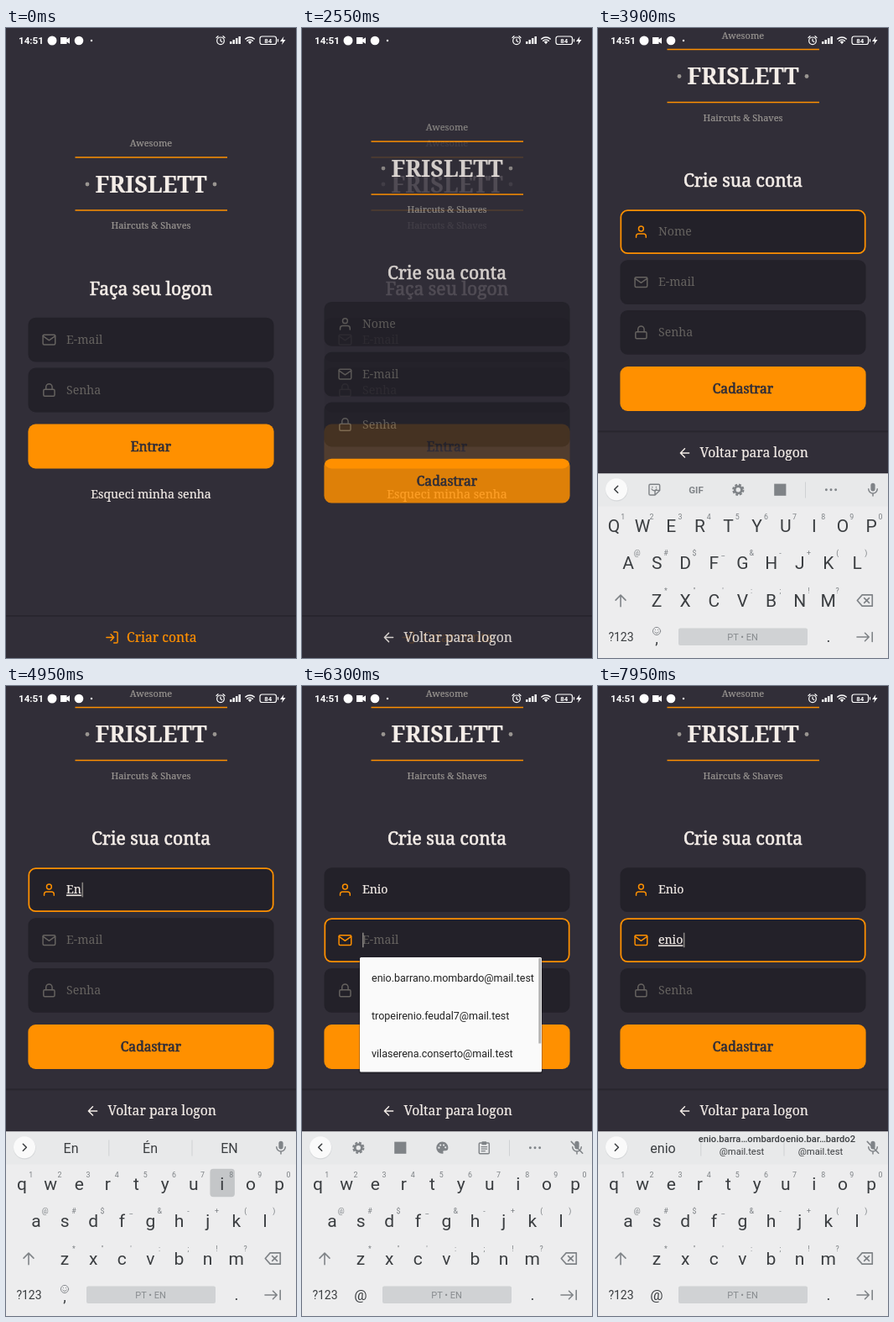
Recreate the animation shown at these times as an HTML page. Size 346 by 750 pixels, loop 8 s.

```html
<!DOCTYPE html>
<html lang="pt-BR">
<head>
<meta charset="utf-8">
<title>Cadastro</title>
<style>
html, body { margin: 0; width: 100%; height: 100%; overflow: hidden; background: #312e38; }
svg { display: block; width: 100vw; height: 100vh; }
text { font-family: Roboto, 'Open Sans', sans-serif; white-space: pre; stroke-width: 0; }
.slab, .slab text { font-family: 'Roboto Slab', 'Noto Serif', serif; }
.slab text { stroke-width: .2px; stroke-linejoin: round; }
.slab .strong { stroke-width: .65px; }
.mid { text-anchor: middle; }
.ic { fill: none; stroke: currentColor; stroke-linecap: round; stroke-linejoin: round; }
.ic .f { fill: currentColor; stroke: none; }
.ic .hole { fill: #e8e9ea; stroke: none; }

.box { fill: #232129; stroke: #232129; stroke-width: 1.76; }
.field { color: #666360; }
.field.on { color: #ff9000; }
.field.focus .box { stroke: #ff9000; }
.hint { fill: #666360; }
.value { fill: #f4ede8; stroke: #f4ede8; }
.value.typing { text-decoration: underline; }
.caret { fill: #85827f; }

#press { animation: press 8s linear infinite; }
#signup { animation: appear 8s linear infinite; }
#form { animation: lift-form 8s step-end infinite; }
#foot { animation: lift-foot 8s step-end infinite; }
#board { animation: slide 8s linear infinite; }
@keyframes press { 0%, 24.2% { opacity: 1 } 25.8%, 28.4% { opacity: .2 } 30.5%, 100% { opacity: 1 } }
@keyframes appear { 0%, 28.5% { opacity: 0 } 32.5%, 100% { opacity: 1 } }
@keyframes lift-form { 0% { transform: none } 46.5%, 100% { transform: translateY(-109.6px) } }
@keyframes lift-foot { 0% { transform: none } 46.5%, 100% { transform: translateY(-219.6px) } }
@keyframes slide {
  0%, 45% { transform: translateY(222px); animation-timing-function: ease-out }
  48%, 100% { transform: none }
}
</style>
</head>
<body>
<svg viewBox="0 0 346 750" preserveAspectRatio="none">
  <rect width="346" height="750" fill="#312e38"/>
  <g id="login" class="slab"></g>
  <g id="signup" class="slab">
    <rect width="346" height="750" fill="#312e38"/>
    <g id="form"></g>
    <g id="foot"></g>
  </g>
  <g id="popup"></g>
  <g id="board">
    <rect y="530.5" width="346" height="220" fill="#ededee"/>
    <rect y="530.5" width="346" height="39" fill="#e8e9ea"/>
    <g id="strip"></g>
    <g id="keys"></g>
  </g>
  <g id="status"></g>
</svg>
<script>
const $ = id => document.getElementById(id);
const ORANGE = '#ff9000', WHITE = '#f4ede8', GREY = '#7f8387', INK = '#3b3e41';

const ICONS = {
  mail: '<rect x="2" y="4" width="20" height="16" rx="2"/><path d="M22 6 12 13 2 6"/>',
  lock: '<rect x="3" y="11" width="18" height="11" rx="2"/><path d="M7 11V7a5 5 0 0 1 10 0v4"/>',
  user: '<path d="M20 21v-2a4 4 0 0 0-4-4H8a4 4 0 0 0-4 4v2"/><circle cx="12" cy="7" r="4"/>',
  enter: '<path d="M15 3h4a2 2 0 0 1 2 2v14a2 2 0 0 1-2 2h-4M10 17l5-5-5-5M15 12H3"/>',
  back: '<path d="M19 12H5M12 19l-7-7 7-7"/>',
  left: '<path d="M14.5 6l-6 6 6 6"/>',
  right: '<path d="M9.5 6l6 6-6 6"/>',
  shift: '<path d="M12 21V4M4.5 11.5 12 4l7.5 7.5"/>',
  erase: '<path d="M22.5 4H8L1 12l7 8h14.5zM11 8.5l7 7M18 8.5l-7 7"/>',
  next: '<path d="M0 12h18M12 6l6 6-6 6M23 5v14"/>',
  smile: '<circle cx="12" cy="12" r="10"/><path d="M7 14a5.5 5.5 0 0 0 10 0M8.5 8.5v.5M15.5 8.5v.5"/>',
  sticker: '<path d="M21 13V5a2 2 0 0 0-2-2H5a2 2 0 0 0-2 2v14a2 2 0 0 0 2 2h8l8-8h-6a2 2 0 0 0-2 2v6M7.5 11a4.5 4.5 0 0 0 8 0M8.5 7.5v.5M15 7.5v.5"/>',
  gear: '<circle cx="12" cy="12" r="5.8" stroke-width="4"/><circle cx="12" cy="12" r="8.6" stroke-width="3" stroke-linecap="butt" stroke-dasharray="4 2.754"/>',
  square: '<rect class="f" x="2" y="2" width="20" height="20"/>',
  palette: '<path class="f" d="M12 2a10 10 0 0 0 0 20c2 0 2.3-1.5 1.6-2.6-.8-1.4.2-2.4 1.5-2.4H17a5 5 0 0 0 5-5C22 6 17 2 12 2z"/>' +
    [[6.5, 12], [9, 7.5], [14.5, 7.5], [17.5, 11.5]].map(([x, y]) => `<circle class="hole" cx="${x}" cy="${y}" r="1.6"/>`).join(''),
  clip: '<rect x="3.5" y="4" width="17" height="18" rx="1.5"/><rect class="f" x="8" y="1.5" width="8" height="5.5" rx="1"/><path d="M7.5 10.5h9M7.5 14h9M7.5 17.5h6"/>',
  dots: '<circle class="f" cx="3" cy="12" r="2.3"/><circle class="f" cx="12" cy="12" r="2.3"/><circle class="f" cx="21" cy="12" r="2.3"/>',
  mic: '<rect class="f" x="8.5" y="1.5" width="7" height="13" rx="3.5"/><path d="M5 11a7 7 0 0 0 14 0M12 18v4"/>',
  muted: '<rect class="f" x="8.5" y="1.5" width="7" height="13" rx="3.5"/><path d="M5 11a7 7 0 0 0 14 0M12 18v4M3 2.5l18 18.5"/>'
};

const icon = (cx, cy, name, color, size = 17.6, weight = 2) =>
  `<g class="ic" ${color ? `color="${color}"` : ''} stroke-width="${weight}" transform="translate(${cx - size / 2} ${cy - size / 2}) scale(${size / 24})">${ICONS[name]}</g>`;
const label = (x, y, str, size, color, cls = '', weight = 400) =>
  `<text x="${x}" y="${y}" font-size="${size}" fill="${color}" stroke="${color}" class="${cls}" font-weight="${weight}">${str}</text>`;
const mid = (x, y, str, size, color, weight) => label(x, y, str, size, color, 'mid', weight);
const strong = (y, str, size, color) => label(173, y, str, size, color, 'mid strong');
const rule = y => `<path d="M82.5 ${y}h181.5" stroke="${ORANGE}" stroke-width="1.6"/>`;

// Form pieces
const logo = dy => `<g transform="translate(0 ${dy})">
  ${mid(173, 141, 'Awesome', 11, '#999591')}${rule(154)}
  <circle cx="97" cy="186" r="2.4" fill="#999591"/><circle cx="249" cy="186" r="2.4" fill="#999591"/>
  ${mid(173, 195.5, 'FRISLETT', 27, WHITE, 700)}${rule(217)}
  ${mid(173, 239, 'Haircuts &amp; Shaves', 11, '#999591')}</g>`;
const field = (y, name, hint, id = '') => `<g class="field" id="${id}" transform="translate(26.4 ${y})">
  <rect class="box" x=".9" y=".9" width="291.4" height="51" rx="8"/>
  ${icon(25, 26.4, name)}
  <text class="hint" x="45.6" y="31.2" font-size="14.1">${hint}</text>
  <text class="value" x="45.6" y="31.2" font-size="14.1"></text>
  <rect class="caret" y="17.5" width="1.6" height="17.5" visibility="hidden"/></g>`;
const button = (y, str) =>
  `<rect x="26.4" y="${y}" width="293.2" height="52.8" rx="8.8" fill="${ORANGE}"/>` +
  strong(y + 32, str, 15.6, '#312e38');
const footer = (name, ix, x, str, color) =>
  `<rect y="699.4" width="346" height="1.1" fill="#232129"/>` +
  icon(ix, 725.5, name, color) + label(x, 731, str, 15.7, color);

$('login').innerHTML = logo(0) + strong(317.5, 'Faça seu logon', 21.1, WHITE) +
  field(344.7, 'mail', 'E-mail') + field(404.6, 'lock', 'Senha') + button(471.6, 'Entrar') +
  mid(173, 560.3, 'Esqueci minha senha', 14.2, WHITE) +
  `<g id="press">${footer('enter', 126.5, 144, 'Criar conta', ORANGE)}</g>`;
$('form').innerHTML = logo(-18.9) + strong(298.6, 'Crie sua conta', 21.1, WHITE) +
  field(325.9, 'user', 'Nome', 'name') + field(385.8, 'mail', 'E-mail', 'mail') +
  field(445.6, 'lock', 'Senha') + button(512.7, 'Cadastrar');
$('foot').innerHTML = footer('back', 103.5, 121.5, 'Voltar para logon', WHITE);

$('popup').innerHTML = `<rect x="68" y="323.5" width="219" height="138" rx="2" fill="#000" opacity=".25"/>
  <rect x="69" y="323" width="217" height="136.5" rx="1.5" fill="#fafafa"/>
  <rect x="282.3" y="324" width="3" height="101.5" fill="#b3b3b3"/>` +
  ['enio.barrano.mombardo', 'tropeirenio.feudal7', 'vilaserena.conserto']
    .map((user, i) => label(83, 351.5 + 45.2 * i, user + '@mail.test', 12.5, '#212121')).join('');

const bars = [3, 5, 7, 9].map((h, i) => `<rect x="${267 + i * 3.5}" y="${19 - h}" width="2.4" height="${h}" fill="#fff"/>`).join('');
$('status').innerHTML = label(15, 19, '14:51', 11.6, '#fff', '', 700) +
  `<circle cx="55" cy="15" r="5.5" fill="#fff"/>
  <path d="M65 11h7.5v2.5l3.5-2.3v7.6l-3.5-2.3v2.5H65z" fill="#fff"/>
  <circle cx="87" cy="15" r="5.3" fill="#fff"/><circle cx="102" cy="15" r="1.2" fill="#fff"/>
  <g fill="none" stroke="#fff" stroke-width="1.2" stroke-linecap="round">
    <circle cx="256" cy="15.3" r="4.3"/><path d="M256 13v2.5l1.8 1M251 11.5l2-1.8M261 11.5l-2-1.8"/>
    <path d="M285.8 13a7.5 7.5 0 0 1 10.4 0M287.7 15.3a4.8 4.8 0 0 1 6.6 0" stroke-width="1.5"/>
    <rect x="303" y="10" width="19.5" height="9.5" rx="2.5"/><path d="M324.5 13.5v2.5"/>
  </g>
  <path d="M288.8 16.5a3.5 3.5 0 0 1 4.4 0L291 19.3z" fill="#fff"/>
  <path d="M331.5 10l-4.5 6h3l-1 4 4.5-6h-3z" fill="#fff"/>` + bars +
  mid(312.7, 17.6, '84', 7.8, '#fff', 700);

// Keyboard
const ROWS = [
  { chars: 'qwertyuiop', x: 19, y: 600.3, hints: '1234567890' },
  { chars: 'asdfghjkl', x: 36, y: 644, hints: '@#$_&-+()' },
  { chars: 'zxcvbnm', x: 70, y: 688.6, hints: '*"\':;!?' }
];
const PITCH = 34.13;

function keys(caps, pressed, mailMode) {
  let out = '';
  for (const { chars, x, y, hints } of ROWS) {
    [...chars].forEach((c, i) => {
      const cx = x + PITCH * i;
      if (c === pressed) out += `<rect x="${cx - 14.5}" y="${y - 25.5}" width="29.5" height="33.5" rx="4" fill="#c4c6c8"/>`;
      out += mid(cx, y, caps ? c.toUpperCase() : c, 21, INK) +
        mid(cx + 10.8, y - 15.8, hints[i].replace('&', '&amp;'), 8.8, '#7c8084');
    });
  }
  const comma = mailMode ? mid(70, 730.5, '@', 17, INK)
    : icon(70, 718, 'smile', GREY, 11, 2) + mid(70, 733, ',', 18, INK);
  return out + icon(27, 681.5, 'shift', GREY, 19) + icon(318.5, 681.5, 'erase', GREY, 20) +
    mid(27.5, 729.6, '?123', 14, INK) + comma +
    `<rect x="96" y="714.5" width="154" height="20.5" rx="2" fill="#d0d2d4"/>` +
    mid(172.5, 729, 'PT • EN', 11, '#888c8f') + mid(275, 730.5, '.', 19, INK) +
    icon(318.5, 725, 'next', GREY, 19);
}

const divider = x => `<path d="M${x} 540.5v19" stroke="#cfd1d3"/>`;
const chevron = dir => `<circle cx="22.2" cy="550.2" r="13.3" fill="#d6d8da"/>
  <circle cx="22" cy="549.3" r="13" fill="#fafafa"/>` + icon(22, 549.3, dir, INK, 16, 2.3);

function strip(word, mailMode) {
  const mic = icon(328, 549.5, mailMode ? 'muted' : 'mic', GREY, 18);
  if (!word) {
    const tools = mailMode ? ['gear', 'square', 'palette', 'clip'] : ['sticker', '', 'gear', 'square'];
    return chevron('left') + tools.map((name, i) => name
      ? icon(67.3 + 50 * i, 549.7, name, GREY, 17)
      : mid(117, 553.5, 'GIF', 11.5, GREY, 700)).join('') +
      divider(247.5) + icon(278, 549.7, 'dots', GREY, 15) + mic;
  }
  const pair = (x, a) => mid(x, 542.5, a, 11.2, INK, 500) + mid(x, 558, '@mail.test', 11.2, INK);
  const rest = mailMode
    ? pair(171.5, 'enio.barra…ombardo') + pair(265.5, 'enio.bar…bardo2')
    : mid(172, 555.5, word.replace('E', 'É'), 16, INK) + mid(266.5, 555.5, word.toUpperCase(), 16, INK);
  return chevron('right') + mid(77.5, 555.5, word, 16, INK) + divider(122.8) + divider(222) + rest + mic;
}

// Timeline, in ms
const LOOP = 8000, HOLD = 180;
const entries = {
  name: { word: 'Enio', hint: 'Nome', focus: 3400, blur: 5850, times: [4600, 4820, 5100, 5350] },
  mail: { word: 'enio', hint: 'E-mail', focus: 5850, blur: LOOP, times: [6900, 7100, 7350, 7560] }
};
const POPUP_AT = 6100;

function typed(entry, t) {
  return entry.word.slice(0, entry.times.filter(at => at <= t).length);
}

function drawField(id, t) {
  const entry = entries[id], g = $(id), value = typed(entry, t);
  const active = t >= entry.focus && t < entry.blur;
  g.classList.toggle('on', active || value !== '');
  g.classList.toggle('focus', active);
  g.querySelector('.hint').textContent = value ? '' : entry.hint;
  const text = g.querySelector('.value'), caret = g.querySelector('.caret');
  text.textContent = value;
  text.classList.toggle('typing', active);
  const since = Math.max(entry.focus, ...entry.times.filter(at => at <= t));
  const shown = active && (t - since) % 1000 < 500;
  caret.setAttribute('x', 45.6 + (value ? text.getComputedTextLength() + .6 : 0));
  caret.setAttribute('visibility', shown ? 'visible' : 'hidden');
}

let drawn = '', start;
function frame(now) {
  start ??= now;
  const t = (now - start) % LOOP;
  drawField('name', t);
  drawField('mail', t);

  const mailMode = t >= entries.mail.focus;
  const entry = mailMode ? entries.mail : entries.name;
  const word = typed(entry, t);
  const i = entry.times.findIndex(at => t >= at - HOLD && t < at);
  const pressed = i < 0 ? '' : entry.word[i].toLowerCase();
  $('popup').setAttribute('visibility', t >= POPUP_AT && !word ? 'visible' : 'hidden');

  const state = [word, pressed, mailMode].join();
  if (state !== drawn) {
    drawn = state;
    $('keys').innerHTML = keys(!mailMode && !word, pressed, mailMode);
    $('strip').innerHTML = strip(word, mailMode);
  }
  requestAnimationFrame(frame);
}
requestAnimationFrame(frame);
</script>
</body>
</html>
```
